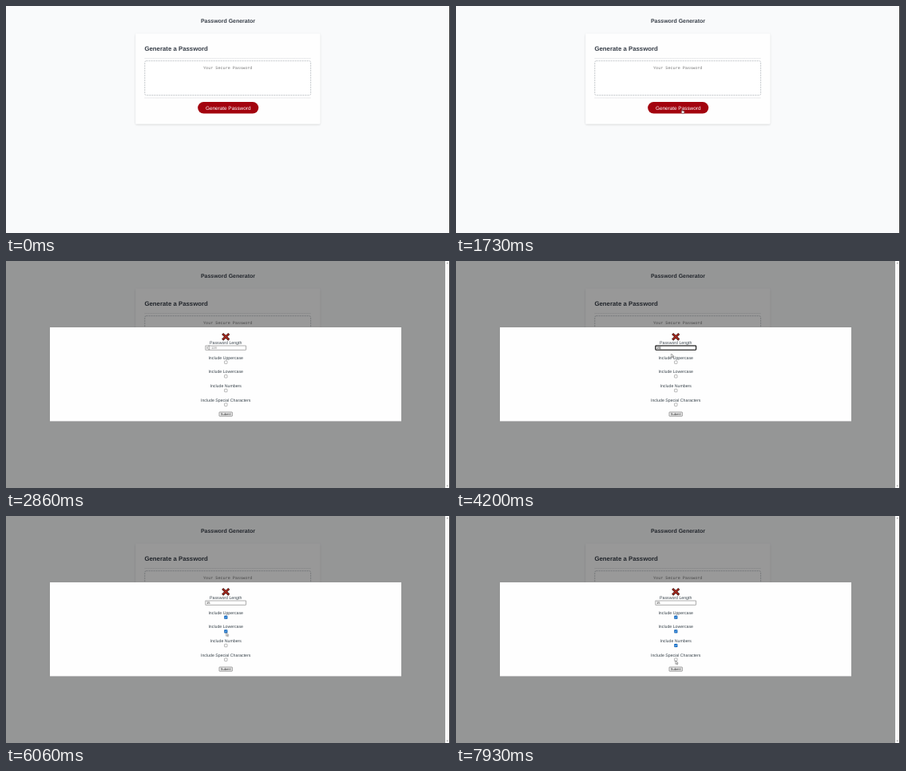
These frames come from a looping animation (556 px wide and 284 px high, 8 s). An HTML page:

```html
<!DOCTYPE html>
<html lang="en">
<head>
<meta charset="utf-8">
<title>Password Generator</title>
<style>
html, body { margin: 0; width: 100%; height: 100%; overflow: hidden; background: #f9fafb; }
svg { display: block; width: 100vw; height: 100vh; }
text { font-family: "Liberation Sans", Arial, sans-serif; fill: #3b4a54; text-rendering: geometricPrecision; }
.mid { text-anchor: middle; }
.bold { font-weight: bold; fill: #363d47; }
.mono { font: 5.12px "Liberation Mono", "Courier New", monospace; fill: #777; }
.label { font-size: 5.22px; text-anchor: middle; fill: #38434b; }
.small { font-size: 4.1px; fill: #222; }

/* One 8 s loop: 1% = 80 ms */
.modal, .hint, .one, .two, .focus, .caret, .upper, .lower, .digits, .arrow, .hand, .beam {
  opacity: 0;
  animation: 8s step-end infinite;
}
.modal  { animation-name: modal; }
.hint   { animation-name: hint; }
.one    { animation-name: one; }
.two    { animation-name: two; }
.focus  { animation-name: focus; }
.caret  { animation-name: caret; }
.upper  { animation-name: upper; }
.lower  { animation-name: lower; }
.digits { animation-name: digits; }
.arrow  { animation-name: arrow; }
.hand   { animation-name: hand; }
.beam   { animation-name: beam; }
.caretpos { animation: caretpos 8s step-end infinite; }
.pointer  { animation: move 8s linear infinite; }

@keyframes modal  { 0% { opacity: 0 } 23.25%  { opacity: 1 } }
@keyframes hint   { 0% { opacity: 1 } 45.75%  { opacity: 0 } }
@keyframes one    { 0% { opacity: 0 } 45.75%  { opacity: 1 } }
@keyframes two    { 0% { opacity: 0 } 46.625% { opacity: 1 } }
@keyframes focus  { 0% { opacity: 0 } 36.625% { opacity: 1 } 62.5% { opacity: 0 } }
@keyframes caret  {
  0% { opacity: 0 } 36.625% { opacity: 1 } 43.25% { opacity: 0 }
  45.75% { opacity: 1 } 53.25% { opacity: 0 } 60% { opacity: 1 } 62.5% { opacity: 0 }
}
@keyframes caretpos {
  0% { transform: translateX(0) }
  45.75% { transform: translateX(2.28px) }
  46.625% { transform: translateX(4.56px) }
}
@keyframes upper  { 0% { opacity: 0 } 62.5%  { opacity: 1 } }
@keyframes lower  { 0% { opacity: 0 } 72.5%  { opacity: 1 } }
@keyframes digits { 0% { opacity: 0 } 85.75% { opacity: 1 } }
@keyframes hand   { 0% { opacity: 0 } 20.75% { opacity: 1 } 23.25% { opacity: 0 } }
@keyframes beam   { 0% { opacity: 0 } 34.125% { opacity: 1 } 52.5% { opacity: 0 } }
@keyframes arrow  {
  0% { opacity: 0 } 8.25% { opacity: 1 } 20.75% { opacity: 0 } 23.25% { opacity: 1 }
  29.125% { opacity: 0 } 32.5% { opacity: 1 } 34.125% { opacity: 0 } 52.5% { opacity: 1 }
}
@keyframes move {
  0%, 20.74% { transform: translate(405px, 138.5px) }
  20.75%, 29.12% { transform: translate(282.3px, 129px) }
  29.125%, 32.5% { transform: translate(268px, 115px) }
  34.125%, 51.7% { transform: translate(254.3px, 106px) }
  52.5% { transform: translate(269.6px, 116px) }
  56.6%, 65% { transform: translate(275.4px, 127px) }
  65.75%, 67% { transform: translate(275.4px, 130.5px) }
  70%, 75% { transform: translate(275.4px, 145px) }
  75.75% { transform: translate(275.6px, 145.6px) }
  80.75%, 86% { transform: translate(275.4px, 163.5px) }
  91.6%, 94% { transform: translate(275.2px, 180.8px) }
  94.2%, 100% { transform: translate(274.9px, 180.8px) }
}
</style>
</head>
<body>
<svg viewBox="0 0 556 284" preserveAspectRatio="none">
  <defs>
    <filter id="shade" x="-5%" y="-10%" width="110%" height="120%">
      <feDropShadow dx="0" dy="0.8" stdDeviation="1.3" flood-opacity=".17"/>
    </filter>
    <rect id="box" x="-1.75" y="-1.75" width="3.5" height="3.5" rx=".5" fill="#fff" stroke="#777" stroke-width=".5"/>
    <g id="tick">
      <rect x="-2" y="-2" width="4" height="4" rx=".6" fill="#0b6bcb"/>
      <path d="M-1.2 0 -.4 .9 1.2 -1" fill="none" stroke="#fff" stroke-width=".65"/>
    </g>
    <path id="cross" d="M-3 -2.8 3 2.8M3 -2.8 -3 2.8"/>
  </defs>

  <rect width="556" height="284" fill="#f9fafb"/>
  <text class="mid bold" x="277.9" y="20.9" font-size="6.96">Password Generator</text>

  <rect x="162.3" y="34.6" width="231" height="113" rx="1.4" fill="#fefefe" filter="url(#shade)"/>
  <text class="bold" x="173.4" y="56.2" font-size="7.82">Generate a Password</text>
  <path d="M173.5 65.5H382M173.5 115H382" stroke="#d3d6d9" stroke-width=".6" stroke-dasharray="1.6 .5"/>
  <rect x="173.8" y="68.7" width="207.8" height="42.9" rx="1.8" fill="#fff" stroke="#b4b9be" stroke-width=".8" stroke-dasharray="2 1"/>
  <text class="mid mono" x="277.7" y="78.5">Your Secure Password</text>
  <rect x="240.2" y="120.1" width="76" height="14.5" rx="7.25" fill="#a3030e"/>
  <text class="mid" x="278.2" y="129.5" font-size="6.4" style="fill:#fff">Generate Password</text>

  <g class="modal">
    <rect width="550" height="284" fill="#000" fill-opacity=".4"/>
    <rect x="55" y="83" width="440" height="117.4" fill="#fefefe"/>
    <g transform="translate(275.2 94.8)" stroke-linecap="square">
      <use href="#cross" stroke="#3a1512" stroke-width="2.9"/>
      <use href="#cross" stroke="#a8281e" stroke-width="1.7"/>
    </g>

    <text class="label" x="275.2" y="104.2">Password Length</text>
    <rect x="249.9" y="106" width="50.7" height="5.2" fill="#fff" stroke="#777" stroke-width=".6"/>
    <rect class="focus" x="249.9" y="106" width="50.7" height="5.2" rx=".6" fill="none" stroke="#111" stroke-width="1.1"/>
    <text class="small hint" x="251" y="110" style="fill:#808080">8 - 128</text>
    <text class="small one" x="251" y="110">1</text>
    <text class="small two" x="253.28" y="110">5</text>
    <g class="caretpos"><path class="caret" d="M251.1 106.8V110.5" stroke="#000" stroke-width=".5"/></g>

    <text class="label" x="275.2" y="122.5">Include Uppercase</text>
    <text class="label" x="275.2" y="140.1">Include Lowercase</text>
    <text class="label" x="275.2" y="157.8">Include Numbers</text>
    <text class="label" x="275.2" y="175.5">Include Special Characters</text>
    <use href="#box" x="275.3" y="126.7"/>
    <use href="#box" x="275.3" y="144.3"/>
    <use href="#box" x="275.3" y="162"/>
    <use href="#box" x="275.3" y="179.7"/>
    <use class="upper" href="#tick" x="275.3" y="126.7"/>
    <use class="lower" href="#tick" x="275.3" y="144.3"/>
    <use class="digits" href="#tick" x="275.3" y="162"/>

    <rect x="267" y="189" width="16.4" height="5.2" rx=".6" fill="#efefef" stroke="#666" stroke-width=".6"/>
    <text class="small mid" x="275.2" y="193">Submit</text>

    <rect x="550.3" width="5" height="284" fill="#f8f8f8"/>
    <path d="M551.7 3.2 552.8 1.8 553.9 3.2zM551.7 280.8 552.8 282.2 553.9 280.8z" fill="#888"/>
  </g>
  <rect x="555" width="1" height="284" fill="#3c3c3e"/>

  <g class="pointer">
    <path class="arrow" d="M0 0V4.5L1.1 3.5 1.9 5.2 2.6 4.9 1.8 3.2H3.2z" fill="#fff" stroke="#333" stroke-width=".45"/>
    <path class="hand" d="M.5 .4Q1 -.1 1.4 .5V2L3.3 2.5Q3.7 2.7 3.6 3.4L3.1 5.6H1L-.4 3.5Q-.3 2.8 .5 3.3z" fill="#fff" stroke="#222" stroke-width=".4"/>
    <path class="beam" d="M-.6 0H.6M0 0V4.8M-.6 4.8H.6" fill="none" stroke="#444" stroke-width=".5"/>
  </g>
</svg>
</body>
</html>
```
